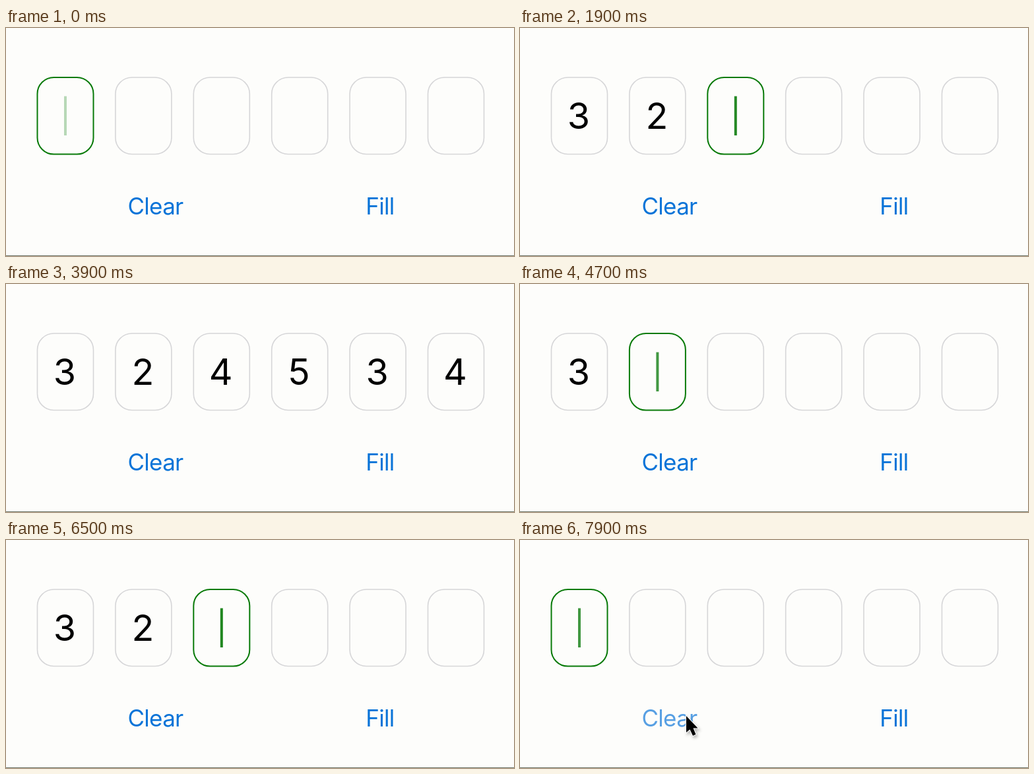
An HTML page for the animation above (8 s loop, 770 px wide and 346 px high).

```html
<!DOCTYPE html>
<html lang="en">
<head>
<meta charset="utf-8">
<title>Code entry</title>
<style>
  html, body { margin: 0; width: 100%; height: 100%; overflow: hidden; background: #fdfdfb; }
  svg { display: block; width: 770px; height: 346px; }
  text { font-family: Inter, Roboto, sans-serif; text-anchor: middle; }
  .box { fill: none; stroke: #d6d6d8; stroke-width: 1.6; }
  .box.focus { stroke: #087a08; stroke-width: 2; }
  .digit { font-size: 55.5px; fill: #000; }
  .button { font-size: 35px; letter-spacing: -0.7px; fill: #0a74d8; }
  #caret { fill: #148014; }
  #pointer { filter: drop-shadow(2px 3px 2px rgba(0, 0, 0, .28)); }
</style>
</head>
<body>
<svg viewBox="0 0 770 346">
  <g id="fields"></g>
  <rect id="caret" y="103.5" width="4" height="59.5"/>
  <text class="button" id="clear" x="226.5" y="283">Clear</text>
  <text class="button" id="fill" x="567" y="283">Fill</text>
  <rect y="345" width="770" height="1" fill="#6e7668"/>
  <path id="pointer" d="M0 0V25L5.5 20.5L10 30L14.5 28L10.5 18.5H17.5Z"
        fill="#000" stroke="#fff" stroke-width="2" paint-order="stroke"/>
</svg>
<script>
const LOOP = 8000, STEP = 100, PULSE = 1350;
const CODE = "324534";
const FILL_AT = 7000, CLEAR_AT = 7700;
const $ = id => document.getElementById(id);

// Digit count over time, built from bursts of evenly spaced keys
const entries = [{ time: -925, count: 0 }];
function press(time, every, keys, change) {
  for (let i = 0; i < keys; i++) {
    const { count } = entries[entries.length - 1];
    entries.push({ time: time + i * every, count: count + change });
  }
}
press(1360, 420, 6, 1);
press(4100, 100, 5, -1);
press(5000, 0, 1, -1);
press(5700, 700, 2, 1);
press(FILL_AT + 100, 0, 1, 4);
press(CLEAR_AT, 0, 1, -6);

// Pointer glides between a few resting places
const corner = [768, 340], field = [86, 104], away = [24, 10];
const onFill = [566, 270], onClear = [252, 267];
const glides = [
  { start: 300, end: 1000, from: corner, to: field },
  { start: 1000, end: 1300, from: field, to: away },
  { start: 6600, end: FILL_AT, from: corner, to: onFill },
  { start: FILL_AT + 200, end: CLEAR_AT - 100, from: onFill, to: onClear }
];

const boxX = i => 47.5 + i * 118.4;

function add(tag, attrs) {
  const el = document.createElementNS("http://www.w3.org/2000/svg", tag);
  for (const key in attrs) el.setAttribute(key, attrs[key]);
  return $("fields").appendChild(el);
}

const fields = [...CODE].map((char, i) => {
  const box = add("rect", { class: "box", x: boxX(i), y: 75, width: 85, height: 116.5, rx: 25 });
  const digit = add("text", { class: "digit", x: boxX(i) + 41.5, y: 152.5 });
  digit.textContent = char;
  return { box, digit };
});

function pointerAt(t) {
  const { start, end, from, to } = glides.findLast(g => g.start <= t) || {};
  if (!from || (to === away && t > end)) return null;
  const k = Math.min(1, (t - start) / (end - start));
  const ease = k * k * (3 - 2 * k);
  return from.map((v, i) => v + (to[i] - v) * ease);
}

function dim(id, t, from, length) {
  $(id).style.opacity = t >= from && t < from + length ? 0.68 : 1;
}

function draw(t) {
  const { time, count } = entries.findLast(e => e.time <= t);
  fields.forEach(({ box, digit }, i) => {
    box.classList.toggle("focus", i === count);
    digit.style.display = i < count ? "" : "none";
  });

  const pulse = (1 + Math.cos(2 * Math.PI * (t - time) / PULSE)) / 2;
  $("caret").setAttribute("x", boxX(count) + 40.5);
  $("caret").style.opacity = count < CODE.length ? pulse : 0;

  dim("fill", t, FILL_AT, 200);
  dim("clear", t, CLEAR_AT, 300);

  const spot = pointerAt(t);
  $("pointer").style.display = spot ? "" : "none";
  if (spot) $("pointer").setAttribute("transform", `translate(${spot})`);
}

const start = performance.now();
function tick() {
  const t = (performance.now() - start) % LOOP;
  draw(Math.floor(t / STEP) * STEP);
  requestAnimationFrame(tick);
}
tick();
</script>
</body>
</html>
```
